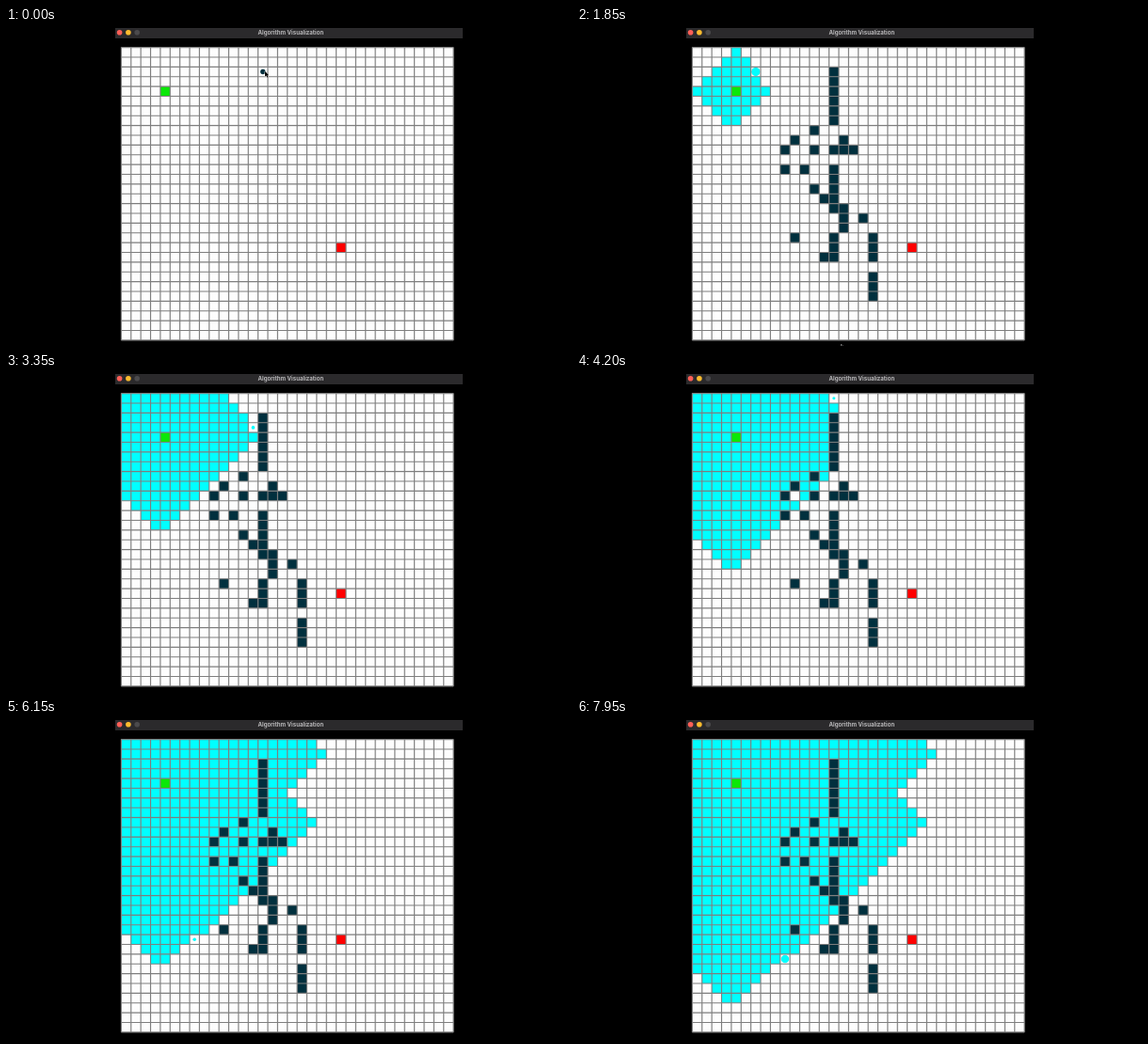
These frames come from a looping animation (600 px wide and 338 px high, 8 s). An HTML page with a canvas:

```html
<!DOCTYPE html>
<html lang="en">
<head>
<meta charset="utf-8">
<title>Algorithm Visualization</title>
<style>
  html, body { margin: 0; width: 100%; height: 100%; overflow: hidden; background: #000; }
  #stage { position: relative; width: 600px; height: 338px; overflow: hidden; }
  canvas { position: absolute; left: 0; top: 0; }
  .bar { position: absolute; left: 115.5px; top: 0; width: 369.5px; height: 11px; background: #2b2a2c; }
  .bar svg { position: absolute; left: 0; top: 0; }
</style>
</head>
<body>
<div id="stage">
  <canvas id="board" width="600" height="338"></canvas>
  <div class="bar">
    <svg width="369.5" height="11">
      <circle cx="4.6" cy="4.7" r="2.8" fill="#ff5f57"/>
      <circle cx="13.9" cy="4.7" r="2.8" fill="#febc2e"/>
      <circle cx="23.2" cy="4.7" r="2.8" fill="#4b4a4c"/>
      <text x="186.4" y="6.8" text-anchor="middle" font-family="Inter, sans-serif"
        font-weight="700" font-size="6.1" fill="#b9b8ba">Algorithm Visualization</text>
    </svg>
  </div>
</div>
<script>
const LOOP = 8000, STEP = 50;
const COLS = 34, ROWS = 30, LEFT = 122.4, TOP = 20.6, SIZE = 10.375;
const START = [4, 4], GOAL = [22, 20];
const WALL = '#01303e', VISITED = '#00ffff';
const ctx = document.getElementById('board').getContext('2d');

// Hand-drawn walls in drawing order: column, row, cells downwards.
const walls = [
  [14, 2, 6], [12, 8], [10, 9], [9, 10], [9, 12], [11, 12], [12, 10], [14, 10],
  [15, 9], [16, 10], [15, 10], [14, 12, 3], [12, 14], [13, 15], [14, 15, 2],
  [15, 16, 3], [14, 19, 3], [13, 21], [10, 19], [17, 17], [18, 19, 3], [18, 23, 3]
].flatMap(([c, r, n = 1]) => Array.from({ length: n }, (_, i) => [c, r + i]));

// Breadth-first order; neighbours are tried left, up, right, down.
function search() {
  const seen = new Set([...walls, START].map(String));
  const queue = [START];
  for (let i = 0; i < queue.length; i++) {
    const [c, r] = queue[i];
    for (const next of [[c - 1, r], [c, r - 1], [c + 1, r], [c, r + 1]]) {
      const [x, y] = next;
      if (x < 0 || y < 0 || x >= COLS || y >= ROWS || seen.has(String(next))) continue;
      seen.add(String(next));
      queue.push(next);
    }
  }
  return queue;
}
const visits = search();

// Time against number of cells done; the fraction is the growing dot.
const wallPace = [[0, 0.54], [780, walls.length]];
const visitPace = [[1340, 0], [2500, 79.45], [4200, 197.3], [5350, 268.4], [7000, 373.5], [7950, 433.85], [8000, 437]];

const center = ([c, r]) => [LEFT + (c + 0.5) * SIZE, TOP + (r + 0.5) * SIZE];

function along(table, t) {
  if (t <= table[0][0]) return table[0].slice(1);
  for (let i = 1; i < table.length; i++) {
    const [t0, ...a] = table[i - 1], [t1, ...b] = table[i];
    if (t <= t1) return a.map((v, k) => v + (b[k] - v) * (t - t0) / (t1 - t0));
  }
  return table[table.length - 1].slice(1);
}

const pointer = [
  ...walls.map((cell, i) => {
    const [x, y] = center(cell);
    return [i * 780 / walls.length, x + 2.2, y - 0.6];
  }),
  [840, 279.3, 301.8], [1250, 279.3, 301.8], [1600, 280.7, 336.4]
];

function fillCell([c, r], color) {
  ctx.fillStyle = color;
  ctx.fillRect(LEFT + c * SIZE, TOP + r * SIZE, SIZE, SIZE);
}

function paint(cells, count, color) {
  const done = Math.floor(count);
  cells.slice(0, done).forEach(cell => fillCell(cell, color));
  if (done >= cells.length || count === 0) return;
  ctx.fillStyle = color;
  ctx.beginPath();
  ctx.arc(...center(cells[done]), 5 * (count - done), 0, Math.PI * 2);
  ctx.fill();
}

function drawLines() {
  ctx.strokeStyle = '#7e7e7e';
  ctx.lineWidth = 1.15;
  ctx.beginPath();
  for (let c = 0; c <= COLS; c++) {
    ctx.moveTo(LEFT + c * SIZE, TOP);
    ctx.lineTo(LEFT + c * SIZE, TOP + ROWS * SIZE);
  }
  for (let r = 0; r <= ROWS; r++) {
    ctx.moveTo(LEFT, TOP + r * SIZE);
    ctx.lineTo(LEFT + COLS * SIZE, TOP + r * SIZE);
  }
  ctx.stroke();
}

function drawPointer(x, y) {
  ctx.save();
  ctx.translate(x, y);
  ctx.fillStyle = '#000';
  ctx.strokeStyle = '#fff';
  ctx.lineWidth = 0.7;
  const shape = new Path2D('M0 0V5.8L1.4 4.6L2.4 6.8L3.4 6.3L2.4 4.2H4.2Z');
  ctx.stroke(shape);
  ctx.fill(shape);
  ctx.restore();
}

function draw(t) {
  ctx.fillStyle = '#000';
  ctx.fillRect(0, 0, 600, 338);
  ctx.fillStyle = '#fdfdfd';
  ctx.fillRect(LEFT, TOP, COLS * SIZE, ROWS * SIZE);
  paint(walls, along(wallPace, t)[0], WALL);
  paint(visits, along(visitPace, t)[0], VISITED);
  fillCell(START, '#0be808');
  fillCell(GOAL, '#ff0000');
  drawLines();
  if (t < 2650) drawPointer(...along(pointer, t));
}

const begin = performance.now();
function tick() {
  const t = (performance.now() - begin) % LOOP;
  draw(Math.floor(t / STEP) * STEP);
  requestAnimationFrame(tick);
}
tick();
</script>
</body>
</html>
```
